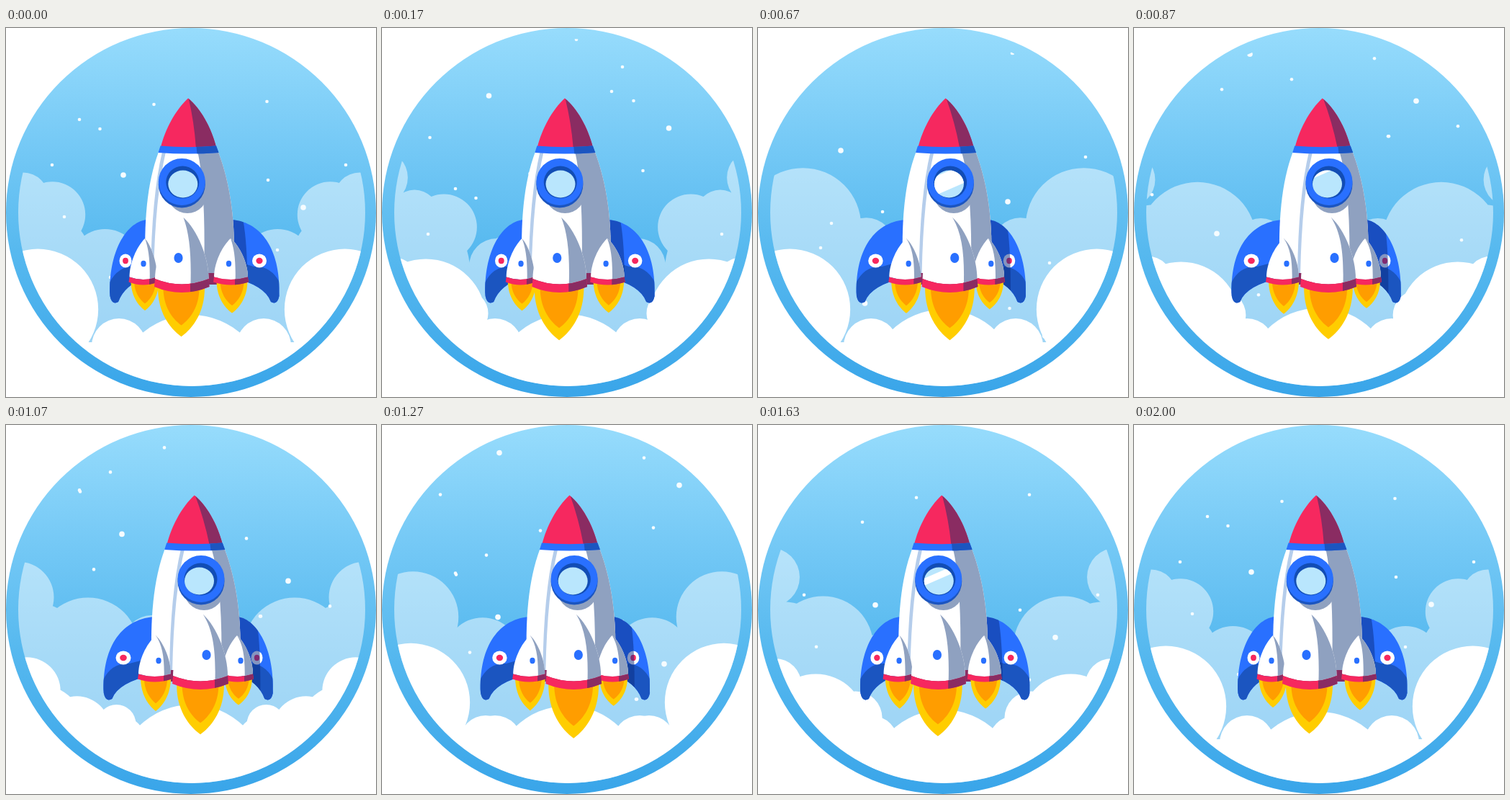
These frames come from a looping animation (514x512 px, 2.03 s). An HTML page with a canvas:

```html
<!DOCTYPE html>
<html lang="en">
<head>
<meta charset="utf-8">
<title>Rocket</title>
<style>
html, body { margin: 0; width: 100%; height: 100%; overflow: hidden; background: #fff }
canvas { display: block }
</style>
</head>
<body>
<canvas id="stage" width="514" height="512"></canvas>
<script>
const ctx = document.getElementById('stage').getContext('2d');
const LOOP = 2030, STEPS = 60, STEP = 1000 / 30, TAU = Math.PI * 2;
const BLUE = '#2970ff', NAVY = '#1b55c0', RED = '#f6285f', WINE = '#8a2c62', SHADE = '#8fa1c0';

const sky = ctx.createLinearGradient(0, 0, 0, 512);
sky.addColorStop(0, '#97dcfc');
sky.addColorStop(.3, '#77caf6');
sky.addColorStop(.6, '#57b9ef');
sky.addColorStop(1, '#39a5e9');

const clamp = v => Math.max(0, Math.min(1, v));
const smooth = v => (v = clamp(v), v * v * (3 - 2 * v));
const mod = (v, m) => (v % m + m) % m;

// A star patch is stamped at several places; its first `big` stars are large
const patches = [
  { big: 2, at: [[163, 204], [148.5, -2], [163, -691]],
    stars: [[0, 0], [250, 45], [-99, -14], [309, -14], [201, 7], [-82, 58], [214, 104], [57, 108], [-18, 142]] },
  { big: 1, at: [[161, -463], [392, -398]], stars: [[0, 0], [58, 35], [-39, 49], [-58, -59]] },
  { big: 1, at: [[115, -214], [347, -143]], stars: [[0, 0], [58, 85], [-13, 101], [-90, -54], [-28, 135]] },
  { big: 0, at: [[270, -80], [102, 127], [102, -524], [455, -205], [354, -349]], stars: [[0, 0]] }];

function drawStars(n) {
  for (const { big, at, stars } of patches)
    for (const [px, py] of at)
      stars.forEach(([x, y], i) => {
        const fall = mod(py + y + 19.2 * n + 10, 1152) - 10;
        if (fall < 512) oval('#f6fcff', px + x, fall, i < big ? 3.8 : 2.3);
      });
}

// Age of something born once per loop, starting a little before its birth
const ageOf = (n, birth, lead) => mod(n - birth + lead, STEPS) - lead;

// Hazy puffs drift in from the side, swell and sink behind the rocket
function hazePuffs(n) {
  const births = [[5.5, 45, 0], [28, 33, 10], [45, 8, -18], [54.5, -5, 0]];
  return births.map(([birth, swell, lift]) => {
    const a = ageOf(n, birth, 12);
    return [4.3 * a, 210 + lift + 110 * Math.sin(Math.PI / 2 * Math.min(1, a / 36)),
      38 + swell * Math.sin(Math.PI * clamp(a / 36))];
  });
}

// White puffs come every third of the loop, each with a smaller companion
function cloudPuffs(n) {
  return [18, 38, 58].flatMap(birth => {
    const a = ageOf(n, birth, 22);
    const x = 40 + 1.8 * a + .17 * a * Math.max(a, 0), y = 385 + 2.7 * a;
    const r = (36 + 48 * Math.exp(-(((a - 4) / 9) ** 4))) * clamp((a + 20) / 8);
    return [[x, y, r], [x + 55, y - 8, 38 * Math.sin(Math.PI * clamp((a - 2) / 16))]];
  });
}

// One union of mirrored circles, so that overlaps stay even
function drawPuffs(color, puffs, base) {
  ctx.beginPath();
  ctx.rect(0, base, 514, 512 - base);
  for (const [x, y, r] of puffs)
    for (const cx of [x, 515 - x]) {
      ctx.moveTo(cx + r, y);
      ctx.arc(cx, y, r, 0, TAU);
    }
  ctx.fillStyle = color;
  ctx.fill();
}

function fill(color, path) {
  ctx.fillStyle = color;
  ctx.fill(typeof path === 'string' ? new Path2D(path) : path);
}

function ellipse(x, y, rx, ry = rx) {
  const p = new Path2D();
  p.ellipse(x, y, rx, ry, 0, 0, TAU);
  return p;
}

const oval = (color, ...shape) => fill(color, ellipse(...shape));

function clipped(path, draw) {
  ctx.save();
  ctx.clip(path);
  draw();
  ctx.restore();
}

function flame(x, top, w, tip) {
  const shape = (color, w, tip) => {
    const h = tip - top, l = x - w / 2, r = x + w / 2;
    fill(color, `M${l} ${top}C${l} ${top + h * .5} ${x - w * .26} ${tip - h * .18} ${x} ${tip}
      C${x + w * .26} ${tip - h * .18} ${r} ${top + h * .5} ${r} ${top}Z`);
  };
  shape('#ffcd00', w, tip);
  shape('#ff9d00', w * .77, top + (tip - top) * .77);
}

function booster({ tip, top, l, r, y, dip, rim, edge, dot, dotY, dotR }) {
  const mid = (l + r) / 2, h = y - top;
  const hull = new Path2D(`M${tip} ${top}C${tip - (tip - l) * .55} ${top + h * .22} ${l} ${top + h * .65} ${l} ${y}
    Q${mid} ${y + dip} ${r} ${y}C${r} ${top + h * .65} ${tip + (r - tip) * .55} ${top + h * .2} ${tip} ${top}Z`);
  const band = new Path2D(`M${l} ${y}Q${mid} ${y + dip} ${r} ${y}L${r + 1} ${y + rim - 1}
    Q${mid} ${y + rim + dip} ${l - 1} ${y + rim - 1}Z`);
  fill('#fff', hull);
  clipped(hull, () => fill(SHADE, `M${tip} ${top}C${edge} ${top + h * .3} ${edge + 2} ${top + h * .7} ${edge} ${y + 20}H${r + 9}V${top}Z`));
  fill(RED, band);
  clipped(band, () => fill(WINE, `M${edge} ${y - 5}H${r + 9}V${y + 30}H${edge}Z`));
  oval(BLUE, dot, dotY, dotR * .87, dotR);
}

// One fin; side is -1 on the left and 1 on the right
function drawFin(side, root, shift, eyeX, eyeR, strip) {
  const X = d => 262 + shift + side * d;
  const fin = new Path2D(`M${root} 266C${X(96)} 270 ${X(120)} 312 ${X(117.5)} 372
    Q${X(115)} 385 ${X(106)} 380Q${X(98)} 357 ${root} 346Z`);
  fill(BLUE, fin);
  clipped(fin, () => {
    fill(NAVY, `M${X(122)} 362Q${X(110)} 329 ${X(82)} 331L${root} 322V390H${X(122)}Z`);
    oval('#fff', eyeX, 323, eyeR, 9.5);
    oval(RED, eyeX, 323, eyeR * .46, 4.2);
    if (strip) fill('rgba(10,45,130,.5)', `M${root} 260H${strip - 7}Q${strip + 2} 300 ${strip} 390H${root}Z`);
  });
}

function drawHull(s, L) {
  const X = x => x + 8.7 * s;
  fill(WINE, `M${L(205, 229)} 338H${L(295, 310)}V356H${L(205, 229)}Z`);

  const hull = new Path2D(`M${X(212)} 172C${X(196)} 215 ${X(191)} 268 ${X(194)} 340
    H${X(316)}C${X(320)} 268 ${X(311)} 215 ${X(295)} 172Z`);
  fill('#fff', hull);
  clipped(hull, () => {
    const top = L(266, 285), low = L(275, 299);
    fill(SHADE, `M${top} 170Q${low + 3} 225 ${low} 345H345V170Z`);
    const a = L(217, 243), b = L(201, 227);
    fill('#b5cdeb', `M${a} 172Q${b + 1} 235 ${b} 345H${b + 4}Q${b + 6} 235 ${a + 5} 172Z`);
    oval(SHADE, L(252, 275), 226, 29, 31);
  });

  const nose = new Path2D(`M${X(253)} 97.5C${X(235)} 114 ${X(221)} 141 ${X(215)} 165
    Q${X(253)} 167 ${X(292)} 165C${X(285)} 138 ${X(270)} 111 ${X(253)} 97.5Z`);
  const band = new Path2D(`M${X(214.5)} 163.5Q${X(253)} 167 ${X(292)} 163.5L${X(295.5)} 173
    Q${X(253)} 176 ${X(211.5)} 173Z`);
  const edge = L(264, 283);
  fill(RED, nose);
  clipped(nose, () => fill(WINE, `M${X(253)} 95Q${(X(253) + edge) / 2 + 3} 130 ${edge} 168H320V95Z`));
  fill(BLUE, band);
  clipped(band, () => fill(NAVY, `M${edge} 160H320V180H${edge + 2}Z`));
}

function drawWindow(n, L) {
  const x = L(244.3, 271), hole = ellipse(x + L(1, -.5), 214, 23, 22.5), gx = x + L(1.5, -2.5);
  const glass = ellipse(gx, 216.5, 20.5, 19);
  oval(NAVY, x, 217, 32.5);
  oval(BLUE, x, 213.5, 32.5);
  fill('#124db4', hole);
  fill('#b9e6fd', glass);
  const shine = (y, half) => clipped(glass, () => fill('#fff',
    `M${gx - 30} ${y - half + 13}L${gx + 30} ${y - half - 13}V${y + half - 13}L${gx - 30} ${y + half + 13}Z`));
  shine(235 - (n - 14) * 4, 13);
  shine(209 - (n - 49) * 4, 5);
}

function drawRocket(n) {
  const s = smooth(n / 26) - smooth((n - 32) / 25), L = (a, b) => a + (b - a) * s;
  const a = n / STEPS * TAU, pulse = Math.cos(4 * a);
  drawFin(-1, L(195, 206), -8.7 * s, L(166, 163), L(8.5, 10.5));
  drawFin(1, L(314, 322), -8.7 * s, L(352, 348.5), L(10, 8), L(335, 353));
  drawHull(s, L);
  drawWindow(n, L);
  flame(L(193, 208), 350, 39 + 3 * s, 394.5 - 2.5 * Math.cos(a));
  flame(L(314, 323), 350, 43 - 5 * s, 392 + 3.5 * Math.cos(a));
  flame(L(243.5, 270), 360, 67.5 - 2.5 * pulse, 431.5 - 3.3 * pulse);
  const small = { top: 292, y: 345.5, dip: 7, rim: 8, dotY: 327, dotR: 4.2 };
  booster({ ...small, tip: L(193, 208), l: L(171.5, 184), r: L(210, 229), edge: L(199, 219), dot: L(191, 212) });
  booster({ ...small, tip: L(312, 321), l: L(289, 300), r: L(336, 343), edge: L(318, 331), dot: L(309.5, 326) });
  booster({ top: 263, y: 348, dip: 15, rim: 12, dotY: 319, dotR: 7,
    tip: L(246.5, 274), l: L(207, 232), r: L(281.5, 308), edge: L(256, 290), dot: L(239.5, 278.5) });
}

function draw() {
  const n = Math.min(STEPS, Math.floor((performance.now() % LOOP + 4) / STEP));
  const bob = 497 + 5 * Math.cos(n / STEPS * TAU);
  ctx.clearRect(0, 0, 514, 512);
  oval(sky, 257, 256, 257, 256);
  clipped(ellipse(258, 256, 241), () => {
    drawPuffs('rgba(255,255,255,.48)', [...hazePuffs(n), [32, 335, 90], [190, 360, 75]], 345);
    drawStars(n);
    drawPuffs('#fff', [...cloudPuffs(n), [45, 425, 65], [157, 441, 38], [257.5, bob, 104]], 436);
  });
  drawRocket(n);
  requestAnimationFrame(draw);
}
draw();
</script>
</body>
</html>
```
